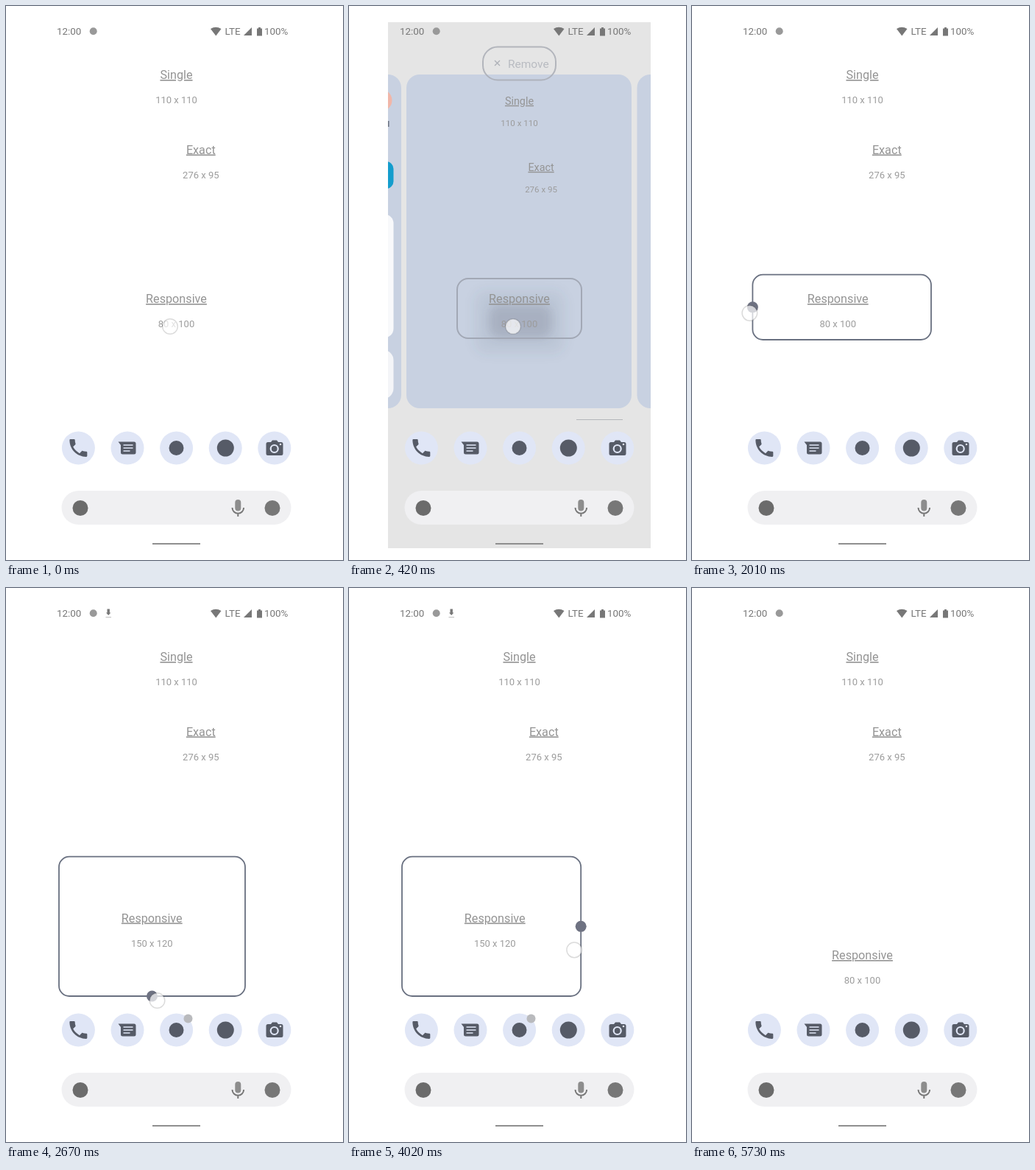
Recreate the animation shown at these times as an HTML page. Size 458 px wide and 752 px high, loop 6.21 s.

```html
<!DOCTYPE html>
<html lang="en">
<head>
<meta charset="utf-8">
<title>Resizing a home screen widget</title>
<style>
html, body { margin: 0; width: 100%; height: 100%; overflow: hidden; background: #fff; }
svg { display: block; width: 458px; height: 752px; font-family: Roboto, sans-serif; }
.title { font-size: 16.2px; fill: #949494; text-anchor: middle; text-decoration: underline 1px #a6a6a6; }
.size { font-size: 13px; fill: #9c9c9c; text-anchor: middle; }
.status { font-size: 13.4px; fill: #777; }
.glyph { fill: #565b67; }
</style>
</head>
<body>
<svg viewBox="0 0 458 752">
  <defs>
    <clipPath id="phone"><rect x="53" y="22" width="357" height="714"/></clipPath>
    <filter id="soft" x="-50%" y="-50%" width="200%" height="200%"><feGaussianBlur stdDeviation="7"/></filter>
  </defs>

  <g id="overlay" clip-path="url(#phone)">
    <rect x="53" y="22" width="357" height="714" fill="#e5e5e5"/>
    <g id="panels">
      <g fill="#c8d1e1">
        <rect x="-235" y="93" width="306" height="453" rx="18"/>
        <rect x="78" y="93" width="306" height="453" rx="18"/>
        <rect x="391.5" y="93" width="306" height="453" rx="18"/>
      </g>
      <circle cx="44" cy="128" r="14.5" fill="#f1b6a8"/>
      <rect x="46" y="156" width="8.5" height="8" fill="#687180"/>
      <rect x="-20" y="211" width="80.5" height="37" rx="10" fill="#149dcd"/>
      <rect x="-20" y="283" width="80.5" height="167" rx="12" fill="#f8f9fb"/>
      <rect x="-20" y="467" width="80.5" height="66" rx="14" fill="#f4f5f8"/>
    </g>
    <path d="M309 561.5h63" stroke="#b4b6ba"/>
    <g filter="url(#soft)" fill="#4d566b">
      <rect x="170" y="385" width="124" height="88" rx="18" opacity=".08"/>
      <rect x="190" y="405" width="86" height="46" rx="14" opacity=".2"/>
    </g>
    <rect x="147" y="370" width="169" height="81" rx="15" fill="none" stroke="#a2a8b5" stroke-width="2"/>
  </g>

  <g id="remove">
    <rect x="182" y="55.5" width="99" height="45" rx="20" fill="none" stroke="#a9acb4" stroke-width="2"/>
    <path d="M198 74l7 7m0-7l-7 7" stroke="#a2a5ad" stroke-width="1.3"/>
    <text x="216" y="83.5" font-size="15.5" fill="#b0b3ba">Remove</text>
  </g>

  <g id="workspace">
    <text class="title" x="231.5" y="99">Single</text>
    <text class="size" x="231.5" y="132.3">110 x 110</text>
    <text class="title" x="264.8" y="200.5">Exact</text>
    <text class="size" x="264.8" y="233.8">276 x 95</text>
  </g>
  <g id="widget">
    <text class="title" y="5.5">Responsive</text>
    <text class="size" id="size" y="38.8"></text>
  </g>

  <g class="status">
    <text x="69" y="38.8">12:00</text>
    <circle cx="118.7" cy="34.3" r="5" fill="#999"/>
    <path d="M278 31Q285 26.5 292.5 31L285.3 40.5Z"/>
    <text x="297.5" y="38.8">LTE</text>
    <path d="M323 40L334 29V40Z"/>
    <path d="M341 30.5h2v-1.5h3v1.5h2v10h-7Z"/>
    <text x="351" y="38.8">100%</text>
  </g>
  <g id="download">
    <path d="M137.5 28.5h3.4v5h1.5l-3.2 3.5l-3.2-3.5h1.5Z" fill="#777"/>
    <path d="M135.5 39.7h7.5" stroke="#bbb"/>
  </g>

  <g id="dock" fill="#e0e6f6"></g>
  <g class="glyph">
    <path transform="translate(82.4 584) scale(1.33)" d="M6.6 10.8c1.4 2.8 3.8 5.1 6.6 6.6l2.2-2.2c.3-.3.7-.4 1-.2 1.1.4 2.3.6 3.6.6.6 0 1 .4 1 1V20c0 .6-.4 1-1 1C10.6 21 3 13.4 3 4c0-.6.4-1 1-1h3.5c.6 0 1 .4 1 1 0 1.2.2 2.4.6 3.6.1.3 0 .7-.3 1Z"/>
    <path d="M152.500 591.500h21.500q2.500 0 2.500 2.500v12q0 2.500-2.500 2.500h-15.500q-2.500 0-2.500-2.500v-10Z"/>
    <path d="M159.500 596h13m-13 4h13m-13 4h9" stroke="#e0e6f6" stroke-width="1.6"/>
    <circle cx="231.5" cy="600" r="10"/>
    <circle cx="298.3" cy="600" r="11.5"/>
    <path d="M356 592h4l2-2.5h6l2 2.5h4q2.5 0 2.5 2.5v13q0 2.5-2.5 2.5h-18q-2.5 0-2.5-2.5v-13q0-2.5 2.5-2.5Z"/>
    <circle cx="364.7" cy="601" r="5" fill="none" stroke="#e0e6f6" stroke-width="2.2"/>
    <circle cx="373" cy="595" r="1.3" fill="#e0e6f6"/>
  </g>
  <circle id="badge" cx="247.5" cy="584.5" fill="#b9babd"/>

  <rect x="75.5" y="658" width="312" height="46" rx="23" fill="#f0f0f2"/>
  <circle cx="101" cy="681.5" r="10.5" fill="#6b6b6b"/>
  <rect x="311.3" y="670" width="8" height="15.5" rx="4" fill="#8d8d8d"/>
  <path d="M307.5 681a7.8 7.8 0 0 0 15.6 0M315.3 689v4" fill="none" stroke="#777" stroke-width="2"/>
  <circle cx="362" cy="681.5" r="10.5" fill="#777"/>
  <path d="M199 730h65" stroke="#8f8f8f" stroke-width="2"/>

  <g id="frame">
    <rect id="outline" rx="14" fill="none" stroke="#697080" stroke-width="1.8"/>
    <g id="handles" fill="#6e7282"></g>
  </g>
  <circle id="touch" r="10.3" fill="#fff" fill-opacity=".7" stroke="#000" stroke-opacity=".14" stroke-width="1.5"/>
</svg>

<script>
const LOOP = 6210, STEP = 30, ZOOM = 0.887, GRIP = 90;

// Each side of the widget: first position, grid pitch, where the finger sits from its handle.
const sides = {
  left: { start: 138.5, pitch: 66.5, finger: [-4, 8] },
  right: { start: 325, pitch: 66.5, finger: [-9, 32] },
  top: { start: 364.7, pitch: 101, finger: [-10, 24] },
  bottom: { start: 453, pitch: 101, finger: [7, 6] }
};

const drag = (side, begin, end, cells) => ({ side, begin, end, cells });
const drags = [
  drag('bottom', 810, 1170, 1), drag('bottom', 1320, 1530, -1),
  drag('left', 1740, 2100, -1), drag('bottom', 2310, 2640, 1),
  drag('right', 2970, 3590, -2), drag('right', 3690, 4260, 3),
  drag('top', 4530, 4735, 1)
];

const el = id => document.getElementById(id);
const ramp = (t, a, b) => Math.min(1, Math.max(0, (t - a) / (b - a)));
const ease = p => p * p * (3 - 2 * p);
const shown = (t, on, off, fade) => ramp(t, on, on + fade) - ramp(t, off, off + fade);
const zoomAt = s => `translate(231.5 407) scale(${s}) translate(-231.5 -407)`;

function set(node, attrs) {
  for (const name in attrs) node.setAttribute(name, attrs[name]);
}
function addCircle(parent, attrs) {
  const c = document.createElementNS('http://www.w3.org/2000/svg', 'circle');
  set(c, attrs);
  return parent.appendChild(c);
}

// A side's drawn position, and its cell offset: a cell flips once two thirds are covered.
function sideAt(name, t) {
  let moved = 0, snapped = 0;
  for (const d of drags.filter(d => d.side === name)) {
    const cells = d.cells * ease(ramp(t, d.begin, d.end));
    moved += cells;
    snapped += Math.sign(cells) * Math.floor(Math.abs(cells) + 0.34);
  }
  return { pos: sides[name].start + moved * sides[name].pitch, cell: snapped };
}

for (let i = 0; i < 5; i++) addCircle(el('dock'), { cx: 98.4 + i * 66.6, cy: 600, r: 22.5 });
for (const name in sides) sides[name].handle = addCircle(el('handles'), { r: 7.5 });

function drawOverlay(t) {
  const k = shown(t, 60, 450, 150);
  const zoom = 1 - (1 - ZOOM) * k * (2 - k);
  set(el('overlay'), { opacity: k });
  set(el('panels'), { transform: zoomAt(zoom / ZOOM) });
  set(el('workspace'), { transform: zoomAt(zoom) });
  set(el('remove'), { opacity: shown(t, 120, 390, 180) });
}

function drawWidget(t) {
  const [left, right, top, bottom] = Object.keys(sides).map(name => sideAt(name, t));
  const cols = 3 + right.cell - left.cell, rows = 1 + bottom.cell - top.cell;
  const x = 231.5 + 33.25 * (left.cell + right.cell);
  const y = 397.5 + 50.5 * (top.cell + bottom.cell);
  set(el('widget'), { transform: `translate(${x} ${y})` });
  el('size').textContent = rows > 1 && cols > 2 ? '150 x 120' : '80 x 100';

  const midX = (left.pos + right.pos) / 2, midY = (top.pos + bottom.pos) / 2;
  const centers = {
    left: [left.pos, midY], right: [right.pos, midY],
    top: [midX, top.pos], bottom: [midX, bottom.pos]
  };
  set(el('frame'), { opacity: shown(t, 540, 5190, 90) });
  set(el('outline'), {
    x: left.pos, y: top.pos, width: right.pos - left.pos, height: bottom.pos - top.pos
  });

  const held = drags.find(d => t >= d.begin - GRIP && t < d.end + GRIP);
  for (const name in sides) {
    const [cx, cy] = centers[name];
    set(sides[name].handle, { cx, cy, opacity: held && held.side !== name ? 0 : 1 });
  }
  drawTouch(t, held && centers[held.side].map((c, i) => c + sides[held.side].finger[i]));
}

function drawTouch(t, grip) {
  const [cx, cy] = grip || [223, 435];
  set(el('touch'), { cx, cy, opacity: grip || t < 450 ? 1 : 0 });
}

function drawNotice(t) {
  const k = shown(t, 1020, 1470, 60) + shown(t, 2580, 5190, 90);
  set(el('download'), { opacity: k });
  set(el('badge'), { r: 6 * k });
}

const start = performance.now();
function tick() {
  const elapsed = (performance.now() - start) % LOOP;
  const t = Math.floor(elapsed / STEP) * STEP;
  drawOverlay(t);
  drawWidget(t);
  drawNotice(t);
  requestAnimationFrame(tick);
}
tick();
</script>
</body>
</html>
```
